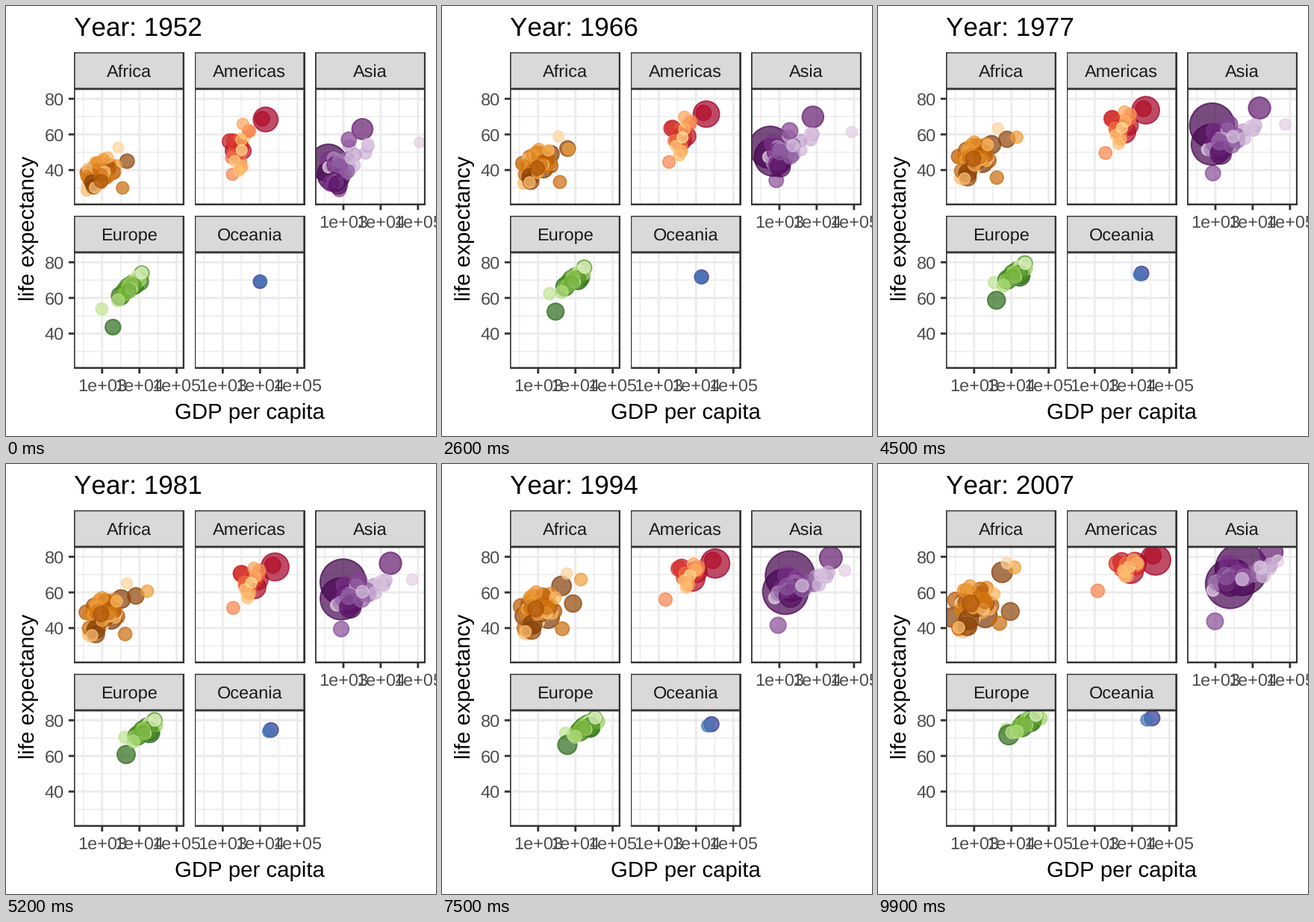
Recreate the animation shown at these times as a matplotlib script. Size 576 by 576 pixels, loop 10000 ms.

```python
import numpy as np
import matplotlib.pyplot as plt
from matplotlib.animation import FuncAnimation
from matplotlib.colors import LinearSegmentedColormap
from matplotlib.patches import Rectangle

W, DPI, FRAMES = 576, 192, 100
LINE = 2.85 * 72 / DPI
MAX_POP = 1319

# Panel layout in pixels and data ranges
LEFT, TOP, PANEL_W, PANEL_H, STRIP_H = 91.2, 62, 146.9, 155, 49
PITCH_X, PITCH_Y = 161.6, 219
X_LO, X_SPAN = 2.2484, 2.9404
Y_HI, Y_SPAN = 85.553, 64.904

plt.rcParams.update({"font.family": "Liberation Sans",
                     "text.hinting": "none",
                     "text.kerning_factor": 6})

# leaders: population rank, millions (first, last), then key points
#          (log10 GDP, life expectancy) evenly spaced in time
# start, end: mean and spread of the other countries
# tie: correlation of wealth and life expectancy
# pop: millions at rank 0 and its decay over the ranks
REGIONS = [
    dict(name="Africa", cell=(0, 0), count=52, pop=(85, 11), growth=3.5,
         start=((2.96, 38.5), (0.22, 4.5)), end=((3.06, 54), (0.3, 7)),
         tie=0.4, bow=(0, 5),
         colors=["#7F3B08", "#B35806", "#E08214", "#FDB863", "#FEE0B6"],
         leaders=[
             (0, (33, 135), (3.03, 36.3), (3.24, 45.2), (3.3, 46.9)),
             (1, (22, 80), (3.15, 41.9), (3.5, 55.5), (3.75, 71.3)),
             (3, (14, 65), (2.89, 39.1), (2.86, 47.8), (2.41, 46)),
             (4, (14, 44), (3.67, 45), (3.9, 58.5), (3.97, 49.3)),
             (19, (4, 12), (3.55, 30), (3.68, 42.7)),
             (32, (1, 6), (3.38, 42.7), (4.22, 60), (4.08, 74)),
             (47, (0.3, 0.8), (3.43, 52.7), (3.88, 76.4))]),
    dict(name="Americas", cell=(1, 0), count=25, pop=(70, 6), growth=2.4,
         start=((3.46, 52), (0.16, 8)), end=((3.88, 74), (0.2, 3.2)),
         tie=0.5, bow=(1, 4),
         colors=["#A50026", "#D73027", "#F46D43", "#FDAE61", "#FEE090"],
         leaders=[
             (1, (56, 190), (3.32, 50.9), (3.84, 62.5), (3.96, 72.4)),
             (5, (15, 33), (4.06, 68.8), (4.33, 75), (4.56, 80.7)),
             (14, (3, 8.5), (3.26, 37.6), (3.29, 50.8), (3.08, 60.9)),
             (2, (30, 109), (3.54, 50.8), (3.94, 66.5), (4.08, 76.2)),
             (0, (157, 301), (4.15, 68.4), (4.39, 74.1), (4.63, 78.2))]),
    dict(name="Asia", cell=(2, 0), count=33, pop=(200, 8), growth=2.7,
         start=((3.13, 46.5), (0.31, 8)), end=((3.82, 71.5), (0.44, 5)),
         tie=0.65, bow=(1, 4),
         colors=["#40004B", "#762A83", "#9970AB", "#C2A5CF", "#E7D4E8"],
         leaders=[
             (12, (8, 32), (2.89, 28.8), (2.94, 39.2), (2.99, 43.8)),
             (0, (556, 1319), (2.6, 44), (2.71, 47.5), (2.85, 64.3),
              (3.08, 66.7), (3.34, 70.2), (3.7, 73)),
             (1, (372, 1110), (2.74, 37.4), (2.92, 56), (3.39, 64.7)),
             (2, (82, 224), (2.88, 37.5), (3.17, 54.6), (3.55, 70.6)),
             (5, (86, 127), (3.51, 63), (4.25, 76), (4.5, 82.6)),
             (31, (0.2, 2.5), (5.04, 55.6), (4.67, 77.6))]),
    dict(name="Europe", cell=(0, 1), count=30, pop=(80, 8), growth=1.25,
         start=((3.74, 66), (0.19, 3.4)), end=((4.35, 77.8), (0.22, 2.7)),
         tie=0.85, bow=(1, 2.5),
         colors=["#276419", "#4D9221", "#7FBC41", "#B8E186", "#E6F5D0"],
         leaders=[
             (23, (2.8, 4.5), (2.99, 53.8), (3.6, 70.2), (3.87, 74.9)),
             (0, (69, 82), (3.85, 67.5), (4.26, 72.8), (4.51, 79.4)),
             (1, (22, 71), (3.29, 43.6), (3.63, 60.2), (3.93, 71.8)),
             (3, (50, 61), (4.0, 69.2), (4.25, 73.6), (4.52, 79.4))]),
    dict(name="Oceania", cell=(1, 1), count=2,
         colors=["#313695", "#4575B4"],
         leaders=[
             (0, (8.7, 20.4), (4.0, 69.1), (4.28, 74.2), (4.54, 81.2)),
             (1, (2, 4.1), (4.02, 69.4), (4.22, 73.4), (4.4, 80.2))]),
]

fig = plt.figure(figsize=(W / DPI, W / DPI), dpi=DPI, facecolor="white")
ax = fig.add_axes([0, 0, 1, 1])
ax.set(xlim=(0, W), ylim=(W, 0))
ax.axis("off")


def text(x, y, s, size, color="black", ha="center", rotation=0):
    return ax.text(x, y, s, fontsize=size, color=color, ha=ha, va="baseline",
                   rotation=rotation, rotation_mode="anchor", zorder=6)


def line(xs, ys, color, width, z):
    ax.plot(xs, ys, color=color, lw=width, zorder=z, snap=False,
            solid_capstyle="butt")


def clip(artist, x, y, w, h):
    artist.set_clip_path(Rectangle((x, y), w, h, transform=ax.transData))


def box(x, y, w, h, fill="none"):
    """Bordered rectangle; the clip reaches a pixel past right and bottom."""
    rect = Rectangle((x, y), w, h, fc=fill, ec="#333333", lw=LINE, zorder=5,
                     snap=False)
    ax.add_patch(rect)
    clip(rect, x, y, w + 1, h + 1)


def px_x(gdp, x):
    return x + (gdp - X_LO) / X_SPAN * PANEL_W


def px_y(life, y):
    return y + (Y_HI - life) / Y_SPAN * PANEL_H


def draw_panel(name, col, row):
    x, top = LEFT + col * PITCH_X, TOP + row * PITCH_Y
    y = top + STRIP_H
    bottom, right = y + PANEL_H, x + PANEL_W

    for k, life in enumerate(range(30, 90, 10)):
        gy, major = px_y(life, y), k % 2
        line([x, right], [gy, gy], "#EBEBEB", LINE * (1 + major) / 2, major)
        if major and col == 0:
            line([x - 7.33, x], [gy, gy], "#333333", LINE, 1)
            text(x - 13.2, gy + 8.3, str(life), 8.8, "#4D4D4D", "right")
    for k in range(6):
        gx, major = px_x(2.5 + k / 2, x), k % 2
        line([gx, gx], [y, bottom], "#EBEBEB", LINE * (1 + major) / 2, major)
        if major and (row == 1 or col == 2):
            line([gx, gx], [bottom, bottom + 7.33], "#333333", LINE, 1)
            text(gx, bottom + 30.7, f"1e+0{3 + k // 2}", 8.8, "#4D4D4D")

    box(x, top, PANEL_W, STRIP_H, "#D9D9D9")
    box(x, y, PANEL_W, PANEL_H)
    text(x + PANEL_W / 2, top + 33.2, name, 8.8, "#1A1A1A")
    return x, y


def invent(region, rank, rng):
    """A country drawn from the region's start and end clouds."""
    (m0, s0), (m1, s1) = np.array(region["start"]), np.array(region["end"])
    tie = region["tie"]
    rest = np.sqrt(1 - tie ** 2)
    wealth, health, gain, luck = np.clip(rng.normal(size=4), -1.7, 1.7)
    later = 0.8 * wealth + 0.6 * gain
    first = m0 + s0 * (wealth, tie * wealth + rest * health)
    last = m1 + s1 * (later, tie * later + rest * (0.6 * health + 0.8 * luck))
    middle = (first + last) / 2 + (0.04, rng.uniform(*region["bow"]))
    top, decay = region["pop"]
    pop = top * np.exp(-rank / decay)
    return rank, (pop / region["growth"], pop), first, middle, last


def make_group(region, rng):
    x, y = draw_panel(region["name"], *region["cell"])
    rows = list(region["leaders"])
    used = {r[0] for r in rows}
    for rank in rng.permutation(region["count"]):
        if rank not in used:
            rows.append(invent(region, rank, rng))

    ramp = LinearSegmentedColormap.from_list(region["name"], region["colors"])
    color = ramp(np.array([r[0] for r in rows]) / (region["count"] - 1))
    color[:, 3] = 0.7
    dots = ax.scatter(np.zeros(len(rows)), np.zeros(len(rows)), s=10,
                      facecolors=color, edgecolors=color, linewidths=0.709,
                      zorder=3)
    clip(dots, x, y, PANEL_W, PANEL_H)
    pops = np.array([r[1] for r in rows])
    tracks = [np.array(r[2:]) for r in rows]
    return dots, tracks, pops, x, y


def at(track, t):
    knots = np.linspace(0, 1, len(track))
    return [np.interp(t, knots, track[:, k]) for k in (0, 1)]


def areas(pop):
    size = 2 + 10 * np.sqrt(pop / MAX_POP)
    return (0.75 * (size * 2.845 + 0.945)) ** 2


rng = np.random.default_rng(7)
groups = [make_group(region, rng) for region in REGIONS]
title = text(LEFT, 40, "", 13.2, ha="left")
text(326.3, 553.2, "GDP per capita", 11)
text(38, 298.3, "life expectancy", 11, rotation=90)


def update(i):
    t = i / (FRAMES - 1)
    title.set_text(f"Year: {round(1952 + 55 * t)}")
    for dots, tracks, pops, x, y in groups:
        gdp, life = np.array([at(track, t) for track in tracks]).T
        dots.set_offsets(np.column_stack([px_x(gdp, x), px_y(life, y)]))
        dots.set_sizes(areas(pops[:, 0] * (1 - t) + pops[:, 1] * t))
    return [title] + [g[0] for g in groups]


anim = FuncAnimation(fig, update, frames=FRAMES, interval=100, repeat=True,
                     repeat_delay=0, blit=False)
plt.show()
```
